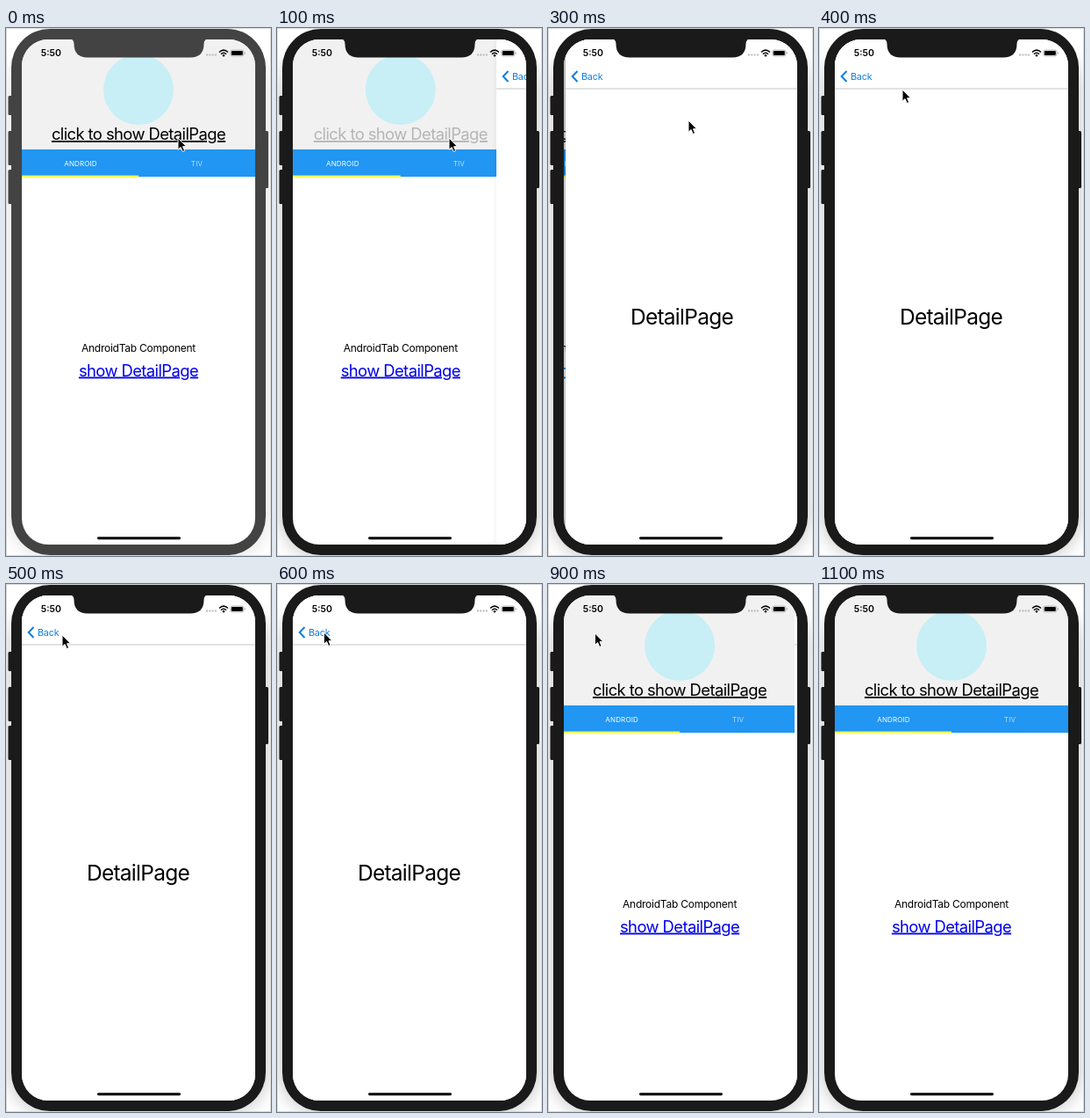
Animation, 302 px wide and 600 px high, one loop 1.2 s. Source, as an HTML page:

```html
<!DOCTYPE html>
<html lang="en">
<head>
<meta charset="utf-8">
<title>Screen transition</title>
<style>
  html, body { margin: 0; width: 100%; height: 100%; overflow: hidden; background: #fff; }
  svg { display: block; width: 302px; height: 600px; }
  text { font-family: Inter, "Liberation Sans", sans-serif; text-anchor: middle; }
  .link { font-size: 18.4px; letter-spacing: -.58px; text-decoration: underline; text-decoration-thickness: 1.3px; text-decoration-skip-ink: none; }
  .tab { font-size: 8px; letter-spacing: .15px; fill: #fff; }
</style>
</head>
<body>
<svg viewBox="0 0 302 600">
  <defs>
    <clipPath id="screen"><rect x="18" y="13" width="266" height="574" rx="30"/></clipPath>
    <filter id="blur" x="-20%" y="-20%" width="140%" height="140%"><feGaussianBlur stdDeviation="9"/></filter>
    <linearGradient id="edge">
      <stop stop-color="#000" stop-opacity="0"/>
      <stop offset="1" stop-color="#000" stop-opacity=".28"/>
    </linearGradient>
  </defs>

  <rect id="glow" x="3" y="22" width="296" height="580" rx="48" filter="url(#blur)"/>
  <rect x=".5" y=".5" width="301" height="599" fill="none" stroke="#d8d8d8"/>

  <g id="body">
    <rect x="6" y="1" width="290" height="598" rx="44"/>
    <rect x="2.5" y="77" width="6" height="22" rx="1.5"/>
    <rect x="2.5" y="117" width="6" height="39" rx="1.5"/>
    <rect x="2.5" y="161" width="6" height="39" rx="1.5"/>
    <rect x="293" y="117" width="6" height="65" rx="1.5"/>
  </g>

  <g clip-path="url(#screen)">
    <rect x="18" y="13" width="266" height="574" fill="#fff"/>
    <g id="home">
      <rect x="18" y="13" width="266" height="125" fill="#f1f1f1"/>
      <circle cx="151" cy="70" r="40" fill="#c8eef6"/>
      <text id="title" class="link" x="151" y="127">click to show DetailPage</text>
      <rect x="18" y="138" width="266" height="31" fill="#2196f3"/>
      <rect x="18" y="167.5" width="133" height="1.5" fill="#ff0"/>
      <text class="tab" x="85" y="156.5">ANDROID</text>
      <text class="tab" x="217.5" y="156.5" opacity=".7">TIV</text>
      <text x="151" y="367.5" font-size="12" letter-spacing="-.24">AndroidTab Component</text>
      <text id="link" class="link" x="151" y="395.5">show DetailPage</text>
    </g>
    <g id="detail">
      <rect id="shade" x="13" y="13" width="5" height="574" fill="url(#edge)"/>
      <rect x="18" y="13" width="266" height="574" fill="#fff"/>
      <rect x="18" y="68.5" width="266" height="1" fill="#c6c6c8"/>
      <path d="M31.5 49 L25.7 55 L31.5 61" fill="none" stroke="#0f7fe0" stroke-width="2"/>
      <text x="48.3" y="59" font-size="10.8" letter-spacing="-.1" fill="#0f7fe0">Back</text>
      <text x="150.5" y="337" font-size="24.5" letter-spacing="-.75">DetailPage</text>
    </g>
  </g>

  <path id="notch" d="M71 12 Q77.500 12 77.500 18 Q77.500 33.500 93 33.500 H210 Q225.500 33.500 225.500 18 Q225.500 12 232 12Z"/>
  <text x="51.300" y="32.300" font-size="10.500" font-weight="600">5:50</text>
  <path d="M228 30.500h12" stroke="#bbb" stroke-width="1.800" stroke-dasharray="2 1.300"/>
  <g fill="none" stroke="#000" stroke-width="1.500">
    <path d="M243 27.500 Q248 22.800 253 27.500"/>
    <path d="M245 29.700 Q248 26.700 251 29.700"/>
  </g>
  <circle cx="248" cy="31.200" r="1.200"/>
  <rect x="255.800" y="25" width="15" height="7" rx="2" fill="#fff" stroke="#999" stroke-width=".7"/>
  <rect x="256.800" y="26" width="13" height="5" rx="1"/>
  <path d="M272.200 27.500v2" stroke="#999"/>
  <rect x="104" y="578.300" width="95" height="2.900" rx="1.400"/>

  <path id="cursor" d="M0 0V13.300L3.100 10.500L5.300 15.500L7.600 14.500L5.500 9.700H9.500Z" stroke="#fff" stroke-width="1"/>
</svg>
<script>
  const WIDTH = 266, STEP = 100, LOOP = 1200;
  // One entry per step: detail page offset, cursor x, cursor y.
  const poses = [
    [266, 196, 125], [232, 196, 125], [20, 196, 125], [2, 160, 105],
    [0, 95, 70], [0, 64, 58], [0, 53.5, 55], [0, 53.5, 55],
    [233, 53.5, 56], [263, 53.5, 56], [266, 190, 80], [266, 320, 100]
  ];
  const el = id => document.getElementById(id);
  const set = (id, name, value) => el(id).setAttribute(name, value);

  function draw(now) {
    const step = Math.floor(now % LOOP / STEP);
    const [offset, x, y] = poses[step];
    const progress = 1 - offset / WIDTH;
    const active = step > 0;
    set("home", "transform", `translate(${-0.3 * WIDTH * progress})`);
    set("detail", "transform", `translate(${offset})`);
    set("shade", "opacity", progress);
    set("cursor", "transform", `translate(${x} ${y})`);
    set("title", "fill", step === 1 ? "#b5b5b5" : "#000");
    set("link", "fill", step === 2 || step === 3 ? "#0a7bd8" : "#00e");
    set("body", "fill", active ? "#1a1a1a" : "#434343");
    set("notch", "fill", active ? "#1a1a1a" : "#434343");
    set("glow", "fill", active ? "#ccc" : "#e4e4e4");
  }

  const start = performance.now();
  function tick() {
    draw(performance.now() - start);
    requestAnimationFrame(tick);
  }
  tick();
</script>
</body>
</html>
```
